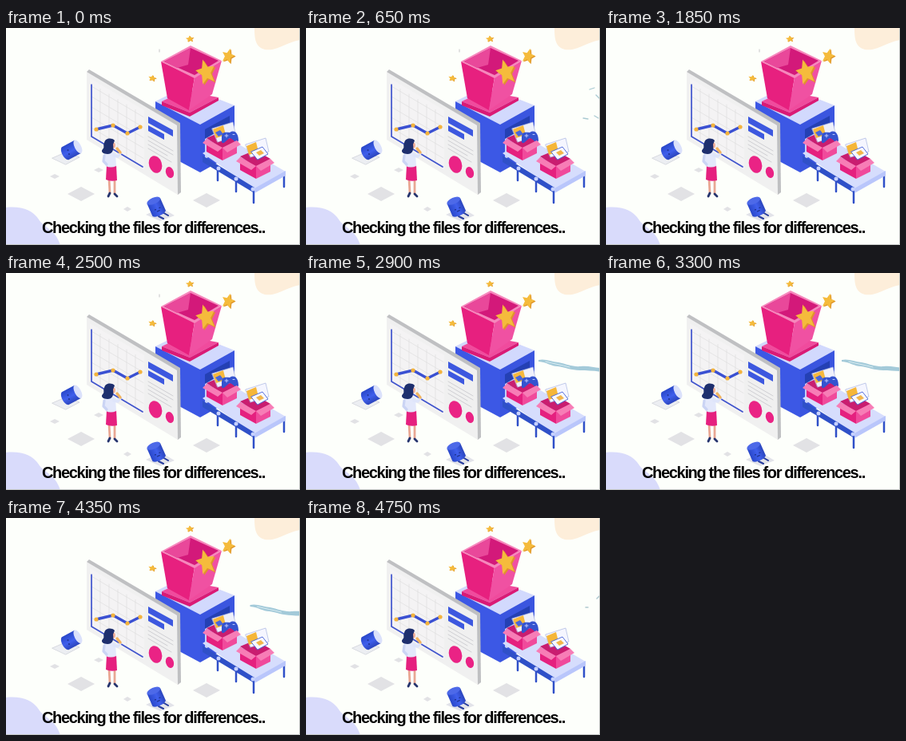
Recreate the animation shown at these times as an HTML page. Size 368 px wide and 272 px high, loop 4.8 s.

```html
<!DOCTYPE html>
<html lang="en">
<head>
<meta charset="utf-8">
<title>Checking files</title>
<style>
html, body { margin: 0; width: 100%; height: 100%; overflow: hidden; background: #fdfffb; }
svg { display: block; width: 368px; height: 272px; }
text { font: bold 20px Impact, "Liberation Sans", Arial, sans-serif; letter-spacing: -1.33px; }
</style>
</head>
<body>
<svg viewBox="0 0 368 272" fill="none" stroke-linejoin="round" stroke-linecap="round">
  <defs>
    <linearGradient id="can">
      <stop stop-color="#2947c9"/><stop offset=".55" stop-color="#4060ec"/><stop offset="1" stop-color="#2b45bd"/>
    </linearGradient>
    <path id="star" d="M0-10 3-3.5 10-3 4.7 1.7 6.2 8.8 0 5-6.2 8.8-4.7 1.7-10-3-3-3.5Z"/>
    <path id="crateBack" fill="#c91d70" d="M-18-9 1-17 20-6 2 4Z"/>
    <g id="crateFront">
      <path fill="#e5207f" d="M-18-8 2 3V19L-18 8Z"/>
      <path fill="#f04a9c" d="M2 3 20-6V10L2 19Z"/>
      <path fill="#f77db6" d="M-18-8 2 3-4 8-23-3ZM2 3 20-6 25-1 8 9Z"/>
    </g>
  </defs>

  <path fill="#fdeeda" d="M311 0C311 13 312 24 324 27 340 29 348 19 368 15V0Z"/>
  <path fill="#d9dbfb" d="M0 225C20 223 34 229 41 240 47 250 61 251 68 272H0Z"/>
  <g id="tiles" fill="#e2e2e5"></g>

  <!-- sorting machine -->
  <path fill="#d2d9fd" d="M187 92 225 73 286 97 243 121Z"/>
  <path fill="#3c58e5" d="M187 92 243 121V181L187 151Z"/>
  <path fill="#3a55df" d="M243 121 286 97V157L243 181Z"/>
  <path fill="#2440b4" d="M249 127 280 110V150L249 164Z"/>
  <path fill="#c4cefb" d="M249 139 263 131 280 141V150L249 164Z"/>
  <path stroke="#2f4fc8" stroke-width="2.5" d="M265 174V191M288 187V205M310 201V219M348 184V199"/>
  <path fill="#d6ddfd" d="M246 157 278 138 350 180 311 202Z"/>
  <path fill="#2f50c8" d="M246 160 311 200V207L246 168Z"/>
  <path fill="#b9c6fb" d="M311 201 350 179V185L311 207Z"/>
  <g fill="#c6d1ff"><circle cx="266" cy="176" r="2.5"/><circle cx="288" cy="189" r="2.5"/><circle cx="309" cy="202" r="2.5"/></g>

  <!-- crates -->
  <use href="#crateBack" x="269" y="147"/>
  <path fill="#eef0fb" stroke="#b6bee6" stroke-width=".7" d="M258 126 284 118 288 135 265 143Z"/>
  <path fill="#f5b83d" d="M259 127 272 122 275 134 263 138Z"/>
  <path fill="#4866d9" d="M262 131 268 128 272 133 266 136Z"/>
  <path fill="#3453cf" d="M270 137C270 129 276 131 280 131 286 127 291 132 291 141 289 147 285 139 280 138 276 140 272 147 270 143Z"/>
  <path stroke="#bdcaff" d="M274 135H278M276 133V137M284 133.5H286"/>
  <use href="#crateFront" x="269" y="147"/>
  <use href="#crateBack" x="311" y="170"/>
  <path fill="#f5f6ff" stroke="#aab5e3" stroke-width=".7" d="M300 146 325 138 329 155 306 162Z"/>
  <path fill="#f5b638" d="M301 148 313 143 316 155 304 159Z"/>
  <path fill="#f7f8ff" stroke="#4562d8" stroke-width=".9" d="M307 155 321 149 328 158 315 165Z"/>
  <path fill="#f2b64b" d="M313 156 319 153 323 157 317 160Z"/>
  <use href="#crateFront" x="311" y="170"/>

  <!-- bin -->
  <path fill="#f04b9d" d="M195 92 222 79 266 87 230 106Z"/>
  <path fill="#da1a76" d="M195 92 230 106V111L195 97ZM230 106 266 87V91L230 111Z"/>
  <path fill="#e7207f" d="M194 42 236 62 229 103 202 88Z"/>
  <path fill="#f051a2" d="M236 62 270 41 258 83 229 103Z"/>
  <path fill="#f687bc" d="M194 42 231 22 270 41 236 63Z"/>
  <path fill="#d3197a" d="M198 42 231 25 266 41 236 59Z"/>
  <path fill="#e9489a" d="M198 42 231 25 228 46 214 50Z"/>
  <g id="stars"></g>

  <!-- chart board -->
  <path fill="#bfc0c2" d="M101 55 104 52 218 119 219 206 215 209Z"/>
  <path fill="#f0f0f0" d="M101 55 214 122 215 209 101 140Z"/>
  <path fill="#f4f3f4" d="M105 63 173 103V178L105 138Z"/>
  <path id="grid" stroke="#dededf" stroke-width=".7"/>
  <path stroke="#4054cd" stroke-width="1.7" d="M107 71V136L171 174"/>
  <path stroke="#3a50d2" stroke-width="3.4" d="M113 127 134 122 152 132 168 124"/>
  <g fill="#f4b43d"><circle cx="113" cy="127" r="2.6"/><circle cx="134" cy="122" r="2.6"/><circle cx="152" cy="132" r="2.6"/><circle cx="168" cy="124" r="2.6"/></g>
  <path fill="#3d58df" d="M178 111 209 128V136L178 119ZM178 122 198 133V140L178 129Z"/>
  <path stroke="#cfcfd3" d="M178 136 209 154M178 141 209 159M178 146 202 160M178 151 207 168"/>
  <g fill="#ea2385">
    <ellipse cx="187" cy="171" rx="8" ry="11" transform="rotate(-18 187 171)"/>
    <ellipse cx="205" cy="181" rx="4.9" ry="7.2" transform="rotate(-18 205 181)"/>
  </g>

  <!-- canisters -->
  <path fill="#eceef2" stroke="#d0d2da" stroke-width=".8" d="M58 163 74 156 92 162 75 171Z"/>
  <g transform="translate(82 153) rotate(62)">
    <path fill="url(#can)" d="M-9-9V9C-7 14 7 14 9 9V-9Z"/>
    <ellipse cy="-9" rx="9" ry="4" fill="#dbe1fb"/>
    <circle cx="-2" cy="4" r="1" fill="#1f348f"/>
    <circle cx="3" cy="5" r="1" fill="#1f348f"/>
  </g>
  <path fill="#e2e3e9" d="M175 234 194 225 211 235 193 242Z"/>
  <path stroke="#253b9d" stroke-width="2" d="M196 231 203 235M191 236 197 239"/>
  <g transform="translate(188 224) rotate(-24)">
    <path fill="url(#can)" d="M-9-8V9C-7 13 7 13 9 9V-8Z"/>
    <ellipse cy="-8" rx="9" ry="4" fill="#4d69e8"/>
    <path stroke="#1f348f" stroke-width="1.3" d="M-3 3H-2M3 3H4M-1 6H2"/>
  </g>

  <!-- woman -->
  <path stroke="#e9a793" stroke-width="2.8" d="M129 189 130 207M136 189V208"/>
  <path stroke="#26356f" stroke-width="2.8" d="M130 207 128 211M136 208 139 211"/>
  <path fill="#e5207f" d="M126 172H138L139 191Q131 193 125 190Z"/>
  <path fill="#e3e8fb" d="M123 157Q130 153 137 157L138 173Q131 176 125 173L121 166Z"/>
  <path stroke="#cbd4f4" stroke-width="3.2" d="M123 160 122 167 126 171"/>
  <path stroke="#dfe5fa" stroke-width="3.5" d="M135 160 140 161 143 157"/>
  <path stroke="#f2b45f" stroke-width="3.5" d="M139 151 143 156"/>
  <circle cx="133" cy="147" r="4" fill="#f1b09a"/>
  <path fill="#1e2f6e" d="M123 144C124 138 132 137 136 141L134 146C135 152 134 158 127 158 122 158 118 155 121 152 124 149 121 148 123 144Z"/>

  <!-- passing ripple -->
  <g id="ripple">
    <path fill="#a3cad9" d="M295 109C303 107 311 111 320 112 330 114 338 118 348 117 358 116 365 119 374 119V124C364 122 356 123 347 122 336 122 328 118 319 117 311 117 306 112 295 111Z"/>
    <path stroke="#d9edf2" d="M304 111C315 114 323 115 334 118"/>
  </g>
  <path id="specks" stroke="#a9cad2" stroke-width="1.3" d="M355 77 361 75M363 84 367 88M347 113 353 114M361 110 366 113"/>
  <path id="lateSpecks" stroke="#afc9d0" stroke-width="1.5" d="M350 112H353M364 101 367 98"/>
  <path id="tick" stroke="#b8b8bd" stroke-width=".8" d="M192 27V30"/>
  <path stroke="#c3c6c3" d="M367.5 0V271.5H0"/>

  <text x="45" y="257" fill="#000">Checking the files for differences..</text>
</svg>
<script>
const LOOP = 4800;
const $ = id => document.getElementById(id);

$('tiles').innerHTML = [[61, 186, 6, 3], [94, 208, 17, 9], [152, 227, 5, 3], [251, 216, 17, 9], [116, 178, 6, 3]]
  .map(([x, y, w, h]) => `<path d="M${x - w} ${y}l${w} ${-h} ${w} ${h} ${-w} ${h}Z"/>`).join('');

// Each star: centre, half width and height in tens of pixels, tilt
$('stars').innerHTML = [[250, 55, 1.2, 1.6, -14], [278, 35, .8, .95, 16], [230, 13.5, .5, .4, -5], [183, 63, .5, .4, 12]]
  .map(([x, y, w, h, tilt]) => {
    const place = `rotate(${tilt}) scale(${w} ${h})`;
    return `<use href="#star" fill="#df9629" transform="translate(${x + w * 1.5} ${y + h}) ${place}"/>
      <use href="#star" fill="#f5bb3c" transform="translate(${x} ${y}) ${place}"/>`;
  }).join('');

let grid = '';
for (let i = 1; i < 6; i++) {
  grid += `M${107 + i * 11} ${70 + i * 6.5}v66`;
  grid += `M107 ${60 + i * 13}l65 38.5`;
}
$('grid').setAttribute('d', grid);

const show = (id, on) => $(id).setAttribute('visibility', on ? 'visible' : 'hidden');

function draw(now) {
  const t = Math.floor(now % LOOP / 50) * 50;
  show('ripple', t >= 2800 && t < 4450);
  show('specks', t >= 600 && t < 1700);
  show('lateSpecks', t >= 4450);
  show('tick', t < 2800);
  $('ripple').setAttribute('transform', `translate(${(t - 3300) / 100} 0)`);
  requestAnimationFrame(draw);
}
draw(performance.now());
</script>
</body>
</html>
```
